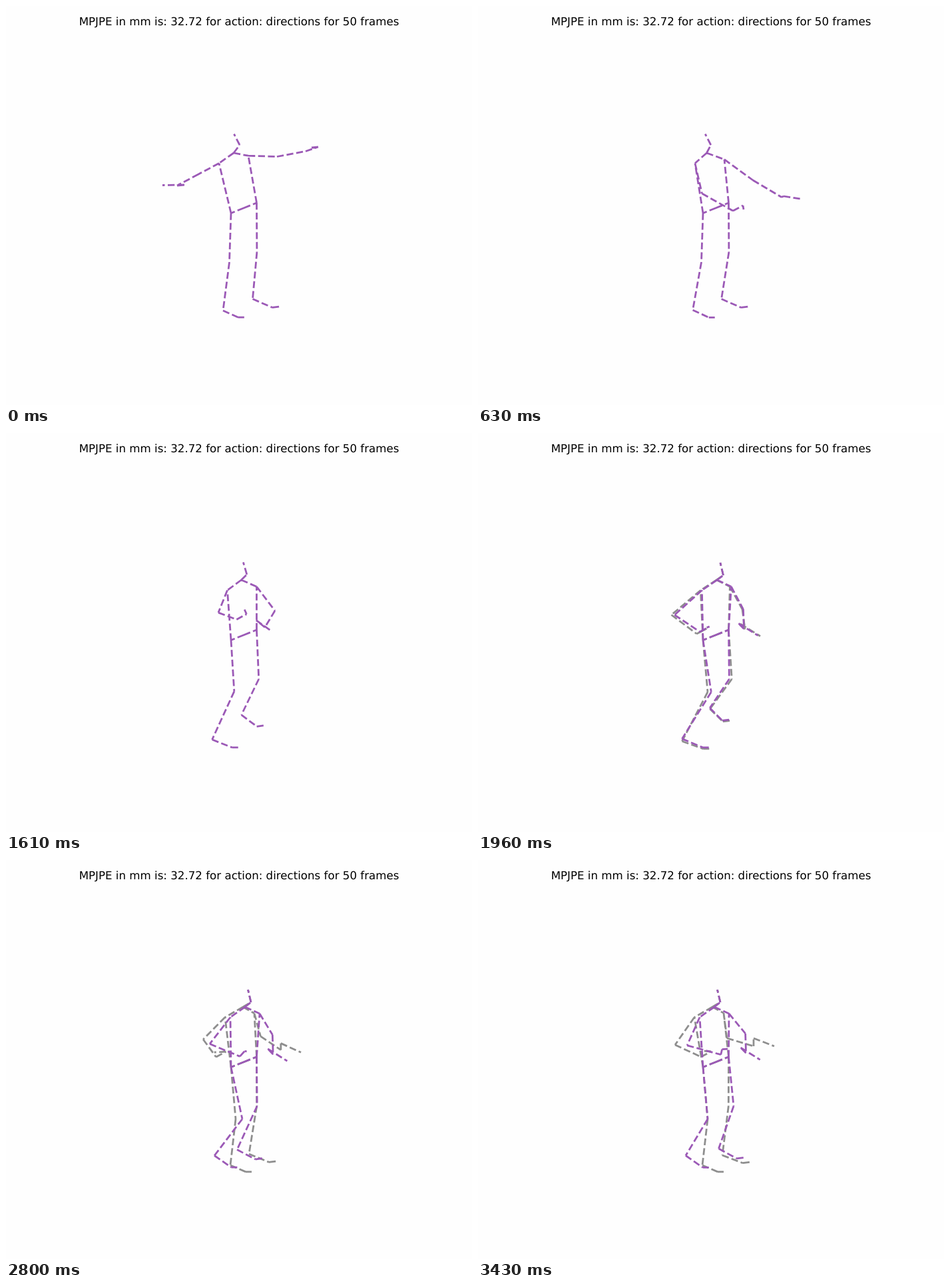
Write an HTML page that moves like this. It is 700 px wide and 600 px high and loops after 3.5 s.

```html
<!DOCTYPE html>
<html lang="en">
<head>
<meta charset="utf-8">
<title>Pose forecast</title>
<style>
  html, body { margin: 0; width: 100%; height: 100%; overflow: hidden; background: #fefefe; }
  svg { display: block; width: 700px; height: 600px; }
  text { font: 16.667px "DejaVu Sans", sans-serif; text-anchor: middle; text-rendering: geometricPrecision; }
  path { fill: none; stroke-width: 2.78; stroke-dasharray: 10.28 4.44; }
  #real { stroke: #8e8e8e; }
  #pred { stroke: #9b59b6; }
</style>
</head>
<body>
<svg viewBox="0 0 700 600">
  <text x="350" y="29">MPJPE in mm is: 32.72 for action: directions for 50 frames</text>
  <path id="real"/>
  <path id="pred"/>
</svg>
<script>
const STEP = 70, STEPS = 50;
const SPLIT = 24;   // last step that both skeletons share
const HOLD = 27;    // the forecast arms stop following here and only drift
const ROOT = [357.3, 303.7], HIP_R = [338, 311.5], HIP_L = [376.5, 296];

// Key points: step, then the coordinates at that step.
const TORSO = [   // shoulder centre x, neck x
  [0, 342, 342], [9, 348, 343.5], [17, 352, 348], [35, 357.5, 363], [40, 351, 356], [49, 347, 352]];
const ANKLE_R = [
  [0, 326, 458], [17, 318.5, 457.5], [28, 306.5, 463.5], [40, 337, 459], [49, 337, 459]];
const ANKLE_L = [
  [0, 370.5, 440.5], [17, 360.5, 437.5], [28, 348.5, 415], [35, 349.5, 433], [40, 365, 442], [49, 367, 444]];
const ARM_R = [   // elbow, wrist, fingertip
  [0, 289, 253, 257, 270, 235, 269.5],
  [9, 336.5, 282, 383, 308, 399, 306],
  [17, 352.5, 267, 367, 260, 380, 236],
  [28, 290.5, 273.5, 328.5, 302, 338, 297],
  [35, 295.5, 267, 309.5, 297, 306, 291],
  [49, 296, 278, 335, 296, 338, 287]];
const ARM_L = [   // elbow, wrist, thumb, fingertip
  [0, 407, 226.5, 450, 218.5, 469, 212, 459, 213],
  [9, 413, 262, 456, 287.5, 459, 286, 487, 290.5],
  [17, 411, 269, 386, 287.5, 369.5, 275.5, 387, 288],
  [28, 397, 265, 401, 295, 394, 287, 424, 305.5],
  [35, 387.5, 264, 411, 289, 410, 280, 440, 295],
  [49, 374, 268, 414, 280, 414, 268, 445, 280]];

const clamp = u => Math.min(1, Math.max(0, u));
function ease(from, to, k) {
  const u = clamp((k - from) / (to - from));
  return u * u * (3 - 2 * u);
}
const move = ([x, y], dx, dy) => [x + dx, y + dy];

// Points on the smooth curve through the keys at step k.
function follow(keys, k) {
  const last = keys.length - 1;
  let i = 0;
  while (i < last - 1 && k >= keys[i + 1][0]) i++;
  const from = keys[i], to = keys[i + 1];
  const span = to[0] - from[0], u = (k - from[0]) / span, w = ease(0, 1, u);
  const slope = (n, j) => {
    const a = keys[Math.max(n - 1, 0)], b = keys[Math.min(n + 1, last)];
    return (b[j] - a[j]) / (b[0] - a[0]) * span;
  };
  const at = j => from[j] + (to[j] - from[j]) * w
    + slope(i, j) * u * (1 - u) ** 2
    - slope(i + 1, j) * u * u * (1 - u);
  const points = [];
  for (let j = 1; j < from.length; j += 2) points.push([at(j), at(j + 1)]);
  return points;
}

// A lifted foot points further down.
function foot(ankle, ground, length, toeX, toeY) {
  const angle = 0.42 + 0.014 * (ground - ankle[1]);
  const ball = move(ankle, length * Math.cos(angle), length * Math.sin(angle));
  return [ankle, ball, move(ball, toeX, toeY)];
}

function legs(k, late, grow) {
  const turn = ease(12, 28, k), wave = Math.sin(Math.PI * late / 25);
  const sway = Math.sin(Math.PI * Math.max(0, late - 3) / 27) ** 2;
  const right = move(follow(ANKLE_R, k)[0], late && -25 * ease(33, 41, k), -14.5 * grow);
  const left = move(follow(ANKLE_L, k)[0], -18 * sway, -0.4 * late);
  const lift = 440 - left[1];
  const kneeR = [335.5 + 9.5 * turn + 11 * wave, 385.5 + 4 * turn];
  const kneeL = [377 + 0.17 * lift - 6 * Math.sin(2 * Math.PI * late / 33), 370];
  return [
    [ROOT, HIP_R, kneeR, ...foot(right, 458, 25 + 0.45 * Math.max(0, 326 - right[0]), 9, 0)],
    [ROOT, HIP_L, kneeL, ...foot(left, 440, 32 - 0.2 * lift, 12, -1.5)]
  ];
}

function arms(k, late) {
  const held = late ? Math.min(k, HOLD) : k, drift = k - held;
  const open = ease(0, 9, k);
  const [elbow, wrist, tip] = follow(ARM_R, held);
  const right = [
    move(elbow, 0.9 * drift, 0.25 * drift),
    move(wrist, 1.5 * drift, -0.3 * drift),
    move(wrist, 11 + 4 * open + 0.9 * drift, -1 - 7 * open - 0.3 * drift),
    move(tip, 1.5 * drift, -0.4 * drift)
  ];
  const left = follow(ARM_L, held).map(p => move(p, 0.15 * drift, -0.2 * drift));
  return [right, left];
}

function skeleton(k, forecast) {
  const late = forecast ? Math.max(0, k - SPLIT) : 0, grow = clamp(late / 16);
  const turn = ease(12, 28, k);
  const [right, left] = arms(k, late);
  let [[mid, neckX]] = follow(TORSO, k);
  mid += 8 * grow;
  neckX += 3 * grow;

  const neck = [neckX, 221];
  const chin = [mid + 9 + 1.6 * (neckX - mid), 209 + 5 * turn];
  const crown = move(chin, -8.5 + 4 * turn, -16.5 - 2.5 * turn);
  const shoulderR = [mid - 22, 236.5];
  const shoulderL = [mid + 22, 231 - 0.08 * Math.max(0, 291 - left[1][1])];
  return [
    ...legs(k, late, grow),
    [HIP_R, shoulderR, ...right],
    [HIP_L, shoulderL, ...left],
    [neck, shoulderR],
    [neck, shoulderL],
    [neck, chin, crown]
  ].map(chain).join("");
}

// Every bone is its own subpath, so its dashes start afresh.
function chain(points) {
  const text = points.map(p => p.map(v => v.toFixed(2)).join());
  return text.slice(1).map((end, i) => `M${text[i]}L${end}`).join("");
}

const real = document.getElementById("real"), pred = document.getElementById("pred");
let shown = -1;

function draw() {
  const k = Math.floor(performance.now() / STEP) % STEPS;
  if (k !== shown) {
    shown = k;
    real.setAttribute("d", k > SPLIT ? skeleton(k, false) : "");
    pred.setAttribute("d", skeleton(k, true));
  }
  requestAnimationFrame(draw);
}
draw();
</script>
</body>
</html>
```
